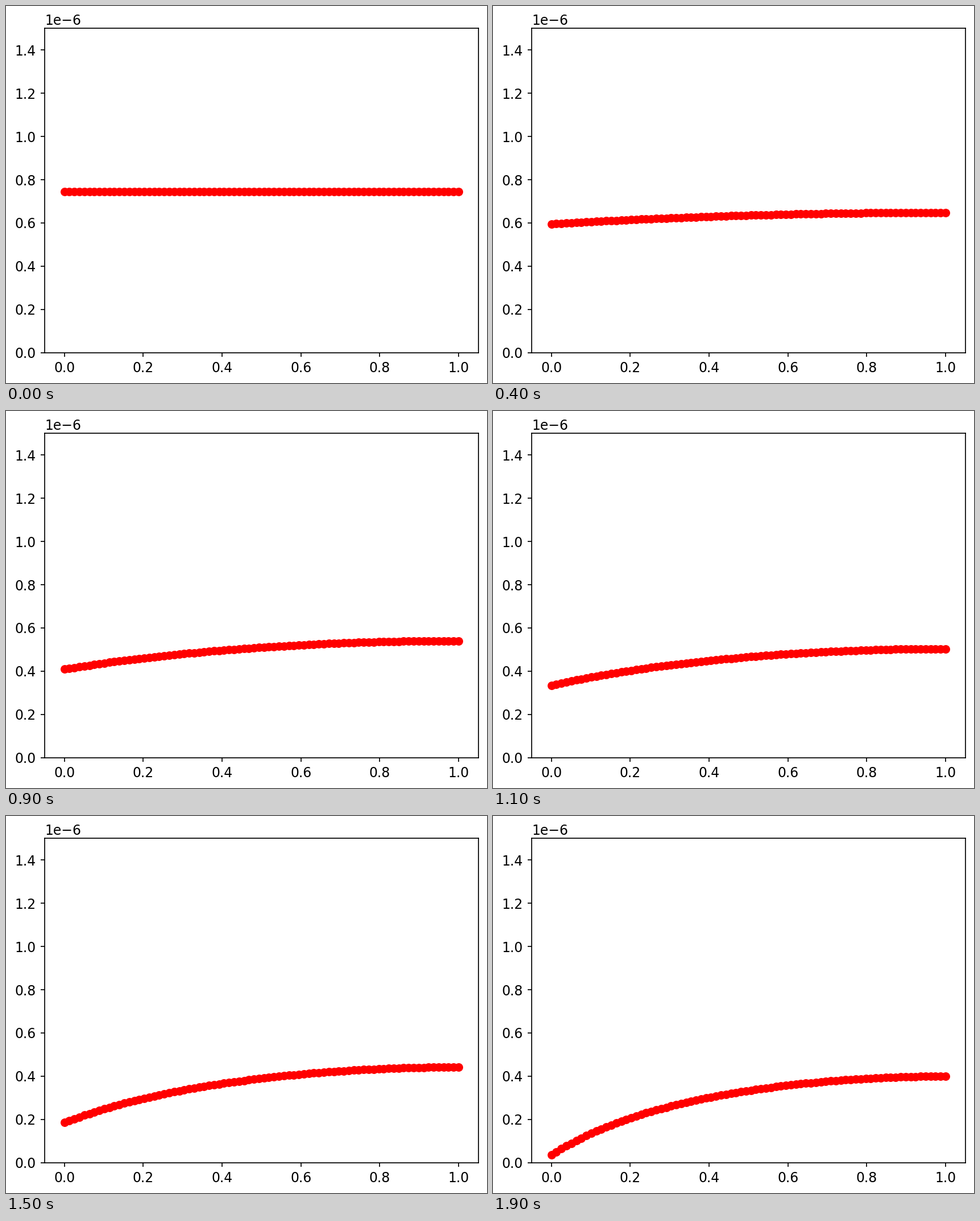
Write a matplotlib script that moves like this. It is 846 px wide and 662 px high and loops after 2000 ms.

```python
import numpy as np
import matplotlib.pyplot as plt
from matplotlib.animation import FuncAnimation

W, H, DPI = 846, 662, 154
FRAMES, INTERVAL = 20, 100
LEFT, RIGHT, TOP, BOTTOM = 68, 830.6, 39.4, 608.6

plt.rcParams.update({"font.family": "DejaVu Sans", "font.size": 11})

x = np.linspace(0, 1, 80)


def profile(n):
    """Level drained at a steady rate on the left, sealed on the right."""
    left = 0.7445 - 0.0373 * n
    right = 0.7455 - 0.025 * n + 8.2e-5 * n ** 2.5
    steep = 1.516e-5 * n ** 3
    bend = right - left - steep
    return 1e-6 * (right - bend * (1 - x) ** 2 - steep * (1 - x) ** 6)


fig = plt.figure(figsize=((W + 0.001) / DPI, (H + 0.001) / DPI), dpi=DPI,
                 facecolor="white")
ax = fig.add_axes([LEFT / W, 1 - BOTTOM / H,
                   (RIGHT - LEFT) / W, (BOTTOM - TOP) / H])
ax.set_xlim(-0.05, 1.05)
ax.set_ylim(0, 1.5e-6)
ax.set_xticks(np.arange(6) / 5)
ax.set_yticks(np.arange(8) * 2e-7)
dots, = ax.plot(x, profile(0), "ro")


def update(n):
    dots.set_ydata(profile(n))
    return dots,


anim = FuncAnimation(fig, update, frames=FRAMES, interval=INTERVAL,
                     repeat=True, repeat_delay=0, blit=False)
plt.show()
```
